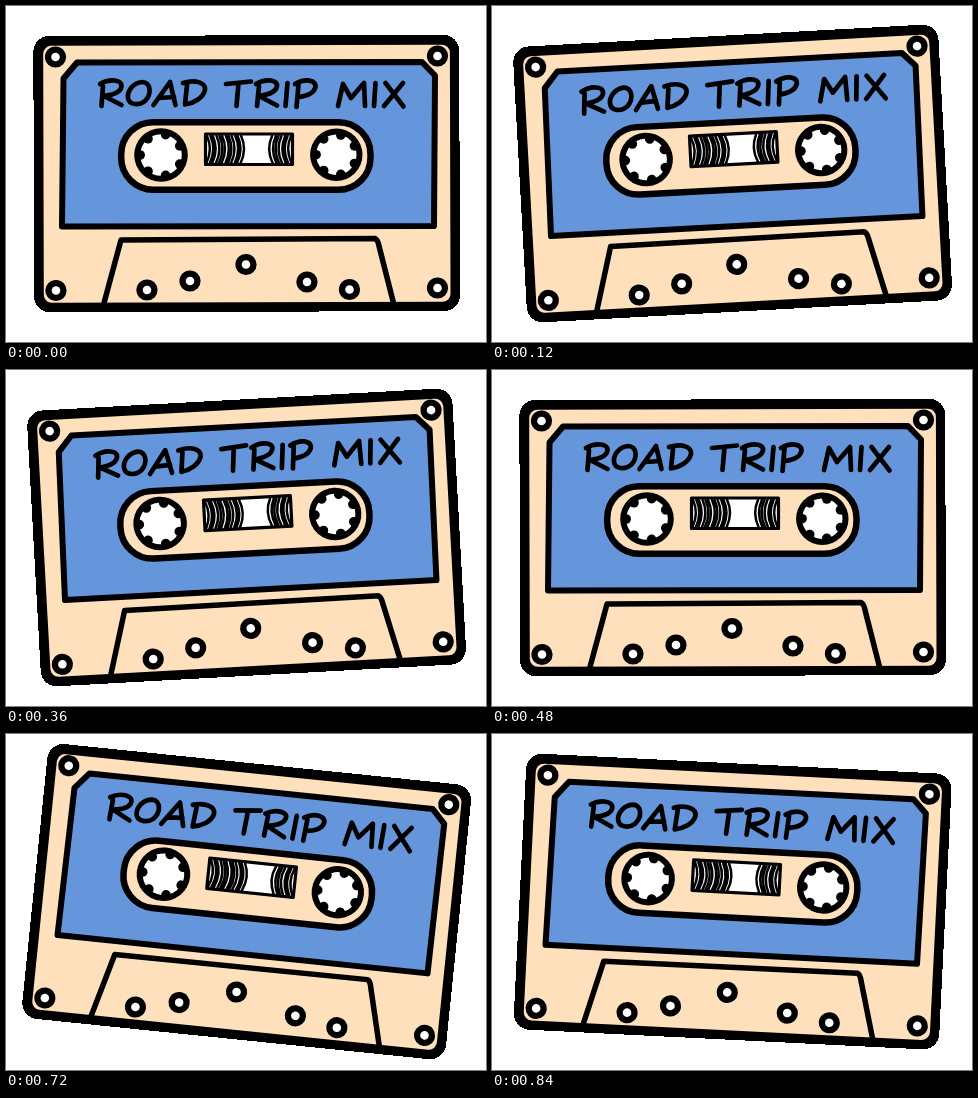
These frames come from a looping animation (480x336 px, 0.96 s). An HTML page:

```html
<!DOCTYPE html>
<html lang="en">
<head>
<meta charset="utf-8">
<title>Mixtape</title>
<style>
  html, body { margin: 0; width: 100%; height: 100%; overflow: hidden; background: #fff; }
  svg { display: block; width: 100%; height: 100%; }
  .line { fill: none; stroke: #000; stroke-linecap: round; stroke-linejoin: round; }
  .shell { fill: #ffe0bc; }
</style>
</head>
<body>
<svg viewBox="0 0 480 336">
  <g id="tape">
    <g transform="rotate(-.15 241 167.5)">
      <rect x="27.7" y="29.4" width="425.900" height="276.300" rx="16" shape-rendering="crispEdges"/>
      <rect class="shell" x="37.5" y="39.3" width="406.700" height="257" rx="8"/>
    </g>
    <path class="line" style="fill:#6596db" stroke-width="6"
      d="M71 56.500L416 56L429 69.500L428 220L56 220.500L57.500 72.500Z"/>
    <g class="line" stroke-width="4.7" role="img" aria-label="ROAD TRIP MIX">
      <path d="M97 80L95.500 100M94 78C104 72 116 74 115.500 80C115 86 106 89 98 90L115.500 99"/>
      <path d="M136 76C127 77 121 85 122 92C123 99 133 100 139 95C146 88 145 76 136 76Z"/>
      <path d="M147.500 99L164 76L169.500 99M153 92L168 91"/>
      <path d="M181 79L179 98.500M177 77C190 73 200 77 199 84C197 92 188 97 179 98.500"/>
      <path d="M220 78L245 75.500M232.500 77L230.500 100"/>
      <path d="M253 80L251 100M250 78C260 72 272 74 271 80C270 86 261 89 253 90L271 99.500"/>
      <path d="M281.500 77L279.500 100"/>
      <path d="M292.500 79L290.500 101M289 78C299 72 310 74 309.500 81C308 87 301 90 293 91"/>
      <path d="M332 100L337 78L345 92L358 77L359 100"/>
      <path d="M369.500 77L368 100"/>
      <path d="M379.500 77L397.500 100.500M397 77L378 100"/>
    </g>
    <rect class="line shell" x="115.2" y="116.2" width="249.300" height="67.500" rx="32" stroke-width="6.5"/>
    <rect x="199.5" y="128" width="87" height="30.500" fill="#fff"/>
    <path id="coils" class="line" stroke-width="2.5"/>
    <rect class="line" x="199.5" y="128" width="87" height="30.500" stroke-width="3.2"/>
    <path class="line" stroke-width="5.5" d="M98 297L115 234L369 232.500Q372 234 373 240L387.500 297"/>
  </g>
</svg>
<script>
  const tape = document.getElementById('tape');
  const coils = document.getElementById('coils');

  function circle(cx, cy, r, fill) {
    const el = document.createElementNS('http://www.w3.org/2000/svg', 'circle');
    Object.entries({ cx, cy, r, fill }).forEach(([key, value]) => el.setAttribute(key, value));
    tape.append(el);
  }

  function screw(x, y) {
    circle(x, y, 10.6, '#000');
    circle(x, y, 4.3, '#fff');
  }

  function reel(x, y, r) {
    const notches = 7;
    const hub = r - 6;
    circle(x, y, r, '#000');
    circle(x, y, hub, '#fff');
    for (let i = 0; i < notches; i++) {
      const a = Math.PI + i * 2 * Math.PI / notches;
      circle(x + hub * Math.cos(a), y + hub * Math.sin(a), 4.8, '#000');
    }
  }

  // Wound tape: bowed strokes running inwards from one end of the window.
  function windings(x, count, dir) {
    let d = '';
    for (let i = 0; i < count; i++) {
      const px = x + dir * (i * 3.1 + Math.sin(i * 2.3) * 0.4);
      d += `M${px} 130Q${px + dir * 6} 143 ${px - dir * 0.5} 157`;
    }
    return d;
  }

  coils.setAttribute('d', windings(201, 12, 1) + windings(285, 7, -1));

  reel(155, 149, 26.8);
  reel(330.3, 148.7, 26.2);
  [[49.5, 51], [431.5, 50], [50, 284.5], [431.5, 282],
   [141, 284], [184, 275], [240, 258.5], [301, 276], [343.5, 283.5]]
    .forEach(([x, y]) => screw(x, y));

  const STEP = 120;
  const ANGLES = [0, -3, -6, -3, 0, 3, 6, 3];
  const start = performance.now();

  function draw() {
    const step = Math.floor((performance.now() - start) / STEP) % ANGLES.length;
    tape.setAttribute('transform', `rotate(${ANGLES[step]} 240 168)`);
    requestAnimationFrame(draw);
  }
  draw();
</script>
</body>
</html>
```
